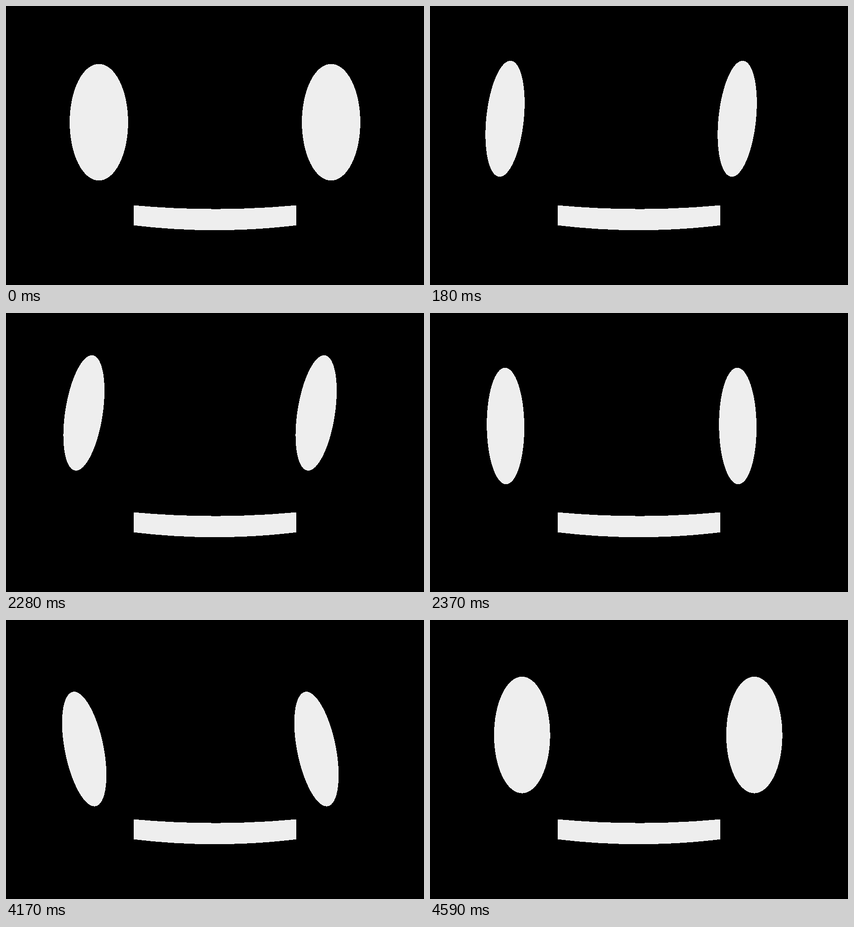
Recreate the animation shown at these times as an HTML page. Size 900 by 600 pixels, loop 9 s.

```html
<!DOCTYPE html>
<html lang="en">
<head>
<meta charset="utf-8">
<style>
  html, body { margin: 0; height: 100%; overflow: hidden; background: #000; }
  svg { display: block; }
</style>
</head>
<body>
<svg width="900" height="600" fill="#eee" shape-rendering="crispEdges">
  <g transform="translate(200 250)"><ellipse class="eye" ry="125.4"/></g>
  <g transform="translate(700 250)"><ellipse class="eye" ry="125.4"/></g>
  <path d="M275 428.6Q450 444.6 625 428.6V471.7Q450 492.7 275 471.7Z"/>
</svg>
<script>
const eyes = document.querySelectorAll('.eye');
const LOOP = 9000, STEP = 30;

// Eye poses: offset along the tilted axes, half width, tilt in degrees
const rest = { x: 0, y: 0, rx: 62.9, tilt: 0 };
const side = { x: -39, y: -3.5, rx: 40.4, tilt: 5.9 };
const up = { x: -37.2, y: -37.2, rx: 40.4, tilt: 11.9 };
const down = { x: -37.3, y: 22.4, rx: 40.4, tilt: -13 };
const back = { x: -1.75, y: -2.75, rx: 60.4, tilt: 0 };

const clamp = u => Math.min(1, Math.max(0, u));
const linear = u => u;
const easeIn = u => u * (0.38 + 0.62 * u);
const easeOut = u => u * (2 - u);

function mix(a, b, u, ease = {}) {
  const pose = {};
  for (const key in a) pose[key] = a[key] + (b[key] - a[key]) * (ease[key] || linear)(u);
  return pose;
}

function poseAt(t) {
  if (t < 2250) {
    const u = clamp(t / 360);
    const pose = u < 0.5 ? mix(rest, side, u * 2) : mix(side, up, u * 2 - 1);
    pose.y = 23.2 * u - 60.4 * u * u; // small dip before looking up
    return pose;
  }
  if (t < 4140) return mix(up, down, clamp((t - 2250) / 240));
  return mix(down, back, clamp((t - 4140) / 450), { x: easeIn, tilt: easeOut });
}

function draw(now) {
  const t = Math.floor((now % LOOP) / STEP) * STEP;
  const { x, y, rx, tilt } = poseAt(t);
  for (const eye of eyes) {
    eye.setAttribute('rx', rx);
    eye.setAttribute('transform', `rotate(${tilt}) translate(${x} ${y})`);
  }
}

let start;
function tick(now) {
  start ??= now;
  draw(now - start);
  requestAnimationFrame(tick);
}
draw(0);
requestAnimationFrame(tick);
</script>
</body>
</html>
```
